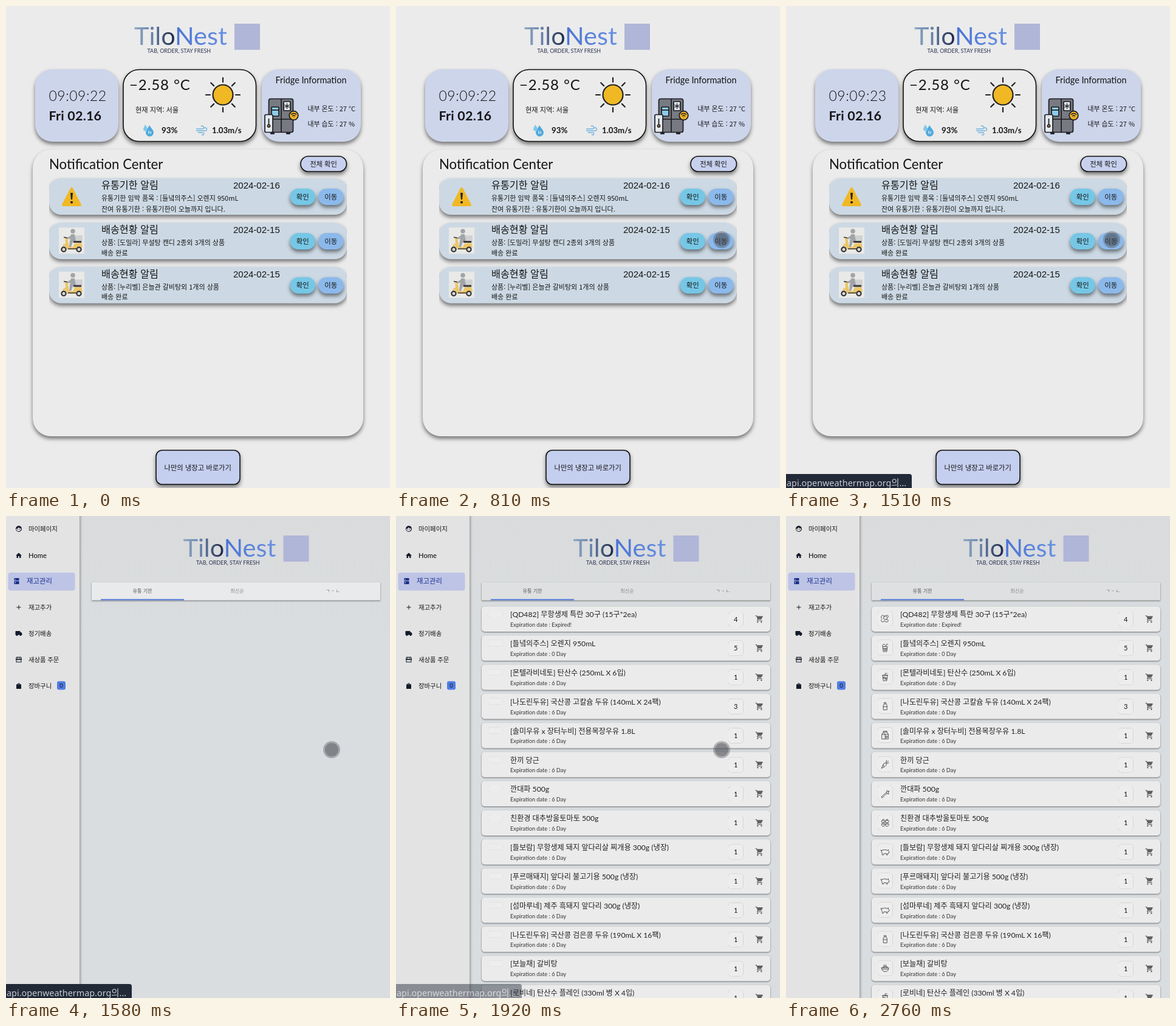
Animation of 632x792 px, one loop 2830 ms. Source, as an HTML page:

```html
<!DOCTYPE html>
<html lang="ko">
<head>
<meta charset="utf-8">
<style>
html, body { margin: 0; height: 100%; overflow: hidden; background: #ebebeb; }
svg { display: block; width: 100vw; height: 100vh; }
text { font-family: Lato, "Noto Sans CJK KR", sans-serif; fill: #151515; white-space: pre; }
.ko { font-family: "Noto Sans CJK KR", sans-serif; font-weight: 500; }
.date { font-family: "Liberation Sans", Arial, sans-serif; }
.mid { text-anchor: middle; }
.deep { filter: drop-shadow(0 4px 3px rgba(0,0,0,.5)); }
.soft { filter: drop-shadow(0 1px 1px rgba(0,0,0,.5)); }
.faint { filter: drop-shadow(0 .8px .6px rgba(0,0,0,.4)); }
.pale { filter: drop-shadow(0 .5px .5px rgba(0,0,0,.2)); }
.line { fill: none; stroke: #383838; stroke-width: 1.1; stroke-linejoin: round; stroke-linecap: round; }
.ink { stroke: #1b1b1f; stroke-width: 1.7; stroke-linejoin: round; }
</style>
</head>
<body>
<svg viewBox="0 0 632 792" preserveAspectRatio="none">
  <defs>
    <linearGradient id="word" gradientUnits="userSpaceOnUse" x1="211" y1="0" x2="364" y2="0">
      <stop offset="0" stop-color="#8ea8c2"/><stop offset=".2" stop-color="#657fa8"/>
      <stop offset=".42" stop-color="#1f2a48"/><stop offset=".44" stop-color="#4a73d3"/>
      <stop offset="1" stop-color="#6a92e2"/>
    </linearGradient>
    <linearGradient id="page" x2="0" y2="1">
      <stop offset="0" stop-color="#dadbdc"/><stop offset=".3" stop-color="#d9dde0"/>
    </linearGradient>
    <clipPath id="list"><rect x="71" y="276" width="490" height="230"/></clipPath>
    <g id="logo">
      <text x="211" y="64" font-size="41.5" style="fill:url(#word)">TiloNest</text>
      <text x="232.5" y="77" font-size="8.9" style="fill:#2c3350">TAB, ORDER, STAY FRESH</text>
      <rect x="376" y="29" width="42" height="43" fill="#b0b6d8"/>
    </g>
    <g id="warn">
      <path d="M37 17L51 44H23Z" fill="#f1b823" stroke="#f1b823" stroke-width="4" stroke-linejoin="round"/>
      <path d="M35 24h4l-1 11h-2z" fill="#222"/><circle cx="37" cy="39.5" r="2.1" fill="#222"/>
    </g>
    <g id="scooter">
      <rect x="16" y="8" width="42" height="43" fill="#e9e9e7"/>
      <rect x="43" y="21" width="12" height="12" fill="#cfd1d2"/>
      <g fill="#a2a5a8"><circle cx="39" cy="14" r="3.800"/>
      <path d="M36 19h6l2 11-5 2-3 8h-3l1-10z"/><path d="M36 21l-8 5 1 2 8-3z"/></g>
      <path d="M26 24l4 1 3 15h6l3-6 11-1 2 7-5 4H30l-4-6-4 2 1-4 4-2z" fill="#ecc668"/>
      <path d="M40 30h13v3H40z" fill="#39363a"/>
      <path d="M24 24l6 1M31 43h14" stroke="#333" stroke-width="1.300"/>
      <g fill="#d9d9d9" stroke="#333" stroke-width="2.200"><circle cx="24" cy="44" r="3.600"/><circle cx="49" cy="44" r="3.600"/></g>
    </g>
  </defs>

  <g id="home">
    <rect width="632" height="792" fill="#ebebeb"/>
    <use href="#logo"/>
    <g fill="#cdd5eb" class="deep">
      <rect x="48" y="104" width="137" height="119" rx="28"/>
      <rect x="421" y="104" width="163" height="119" rx="28"/>
      <rect x="193" y="104.500" width="218.500" height="118" rx="26" fill="#ebebeb" stroke="#111" stroke-width="1.600"/>
    </g>
    <text id="clock" x="70.500" y="156" font-size="23" font-weight="300" letter-spacing=".5"></text>
    <text x="70.500" y="188" font-size="21.500" font-weight="700" letter-spacing=".2">Fri 02.16</text>
    <text x="203" y="138" font-size="24" letter-spacing=".9">−2.58 °C</text>
    <text class="ko" x="213" y="174.500" font-size="11.200">현재 지역: 서울</text>
    <text x="256" y="209" font-size="13.300" font-weight="700">93%</text>
    <text x="339" y="209" font-size="13.200" font-weight="700">1.03m/s</text>
    <g id="sun" transform="translate(357 146)" stroke="#222" stroke-width="2.200" stroke-linecap="round">
      <circle r="16.500" fill="#f0b824"/>
    </g>
    <path d="M236 196c5 7 7 9 7 12a6 6 0 0 1-13 0c0-3 3-6 6-12z" fill="#4fa9dc"/>
    <path d="M229 195c3 4 4 5 4 7a3.500 3.500 0 0 1-7 0c0-2 2-4 3-7z" fill="#81c7ea"/>
    <path d="M235 205v5m3-4v4" stroke="#e4f3fb" stroke-width="1.300"/>
    <path d="M313 202h10a2.500 2.500 0 1 0-2-4M313 205h15a2.500 2.500 0 1 0-2-4M316 208h8a2 2 0 1 1-2 3" fill="none" stroke="#72b4de" stroke-width="1.400"/>
    <text x="443.500" y="127" font-size="14.400">Fridge Information</text>
    <text class="ko" x="496.500" y="173" font-size="10.900">내부 온도 : 27 °C</text>
    <text class="ko" x="496.500" y="198" font-size="10.900">내부 습도 : 27 %</text>
    <g class="ink">
      <path d="M436 207h5v3h-5zm26 0h5v3h-5z" fill="#333"/>
      <rect x="432.500" y="152.500" width="40" height="55" rx="3" fill="#777a82"/>
      <path d="M453 153v54M433 186h39" fill="none"/>
      <rect x="437" y="166" width="12" height="15" rx="1" fill="#8ccbe9"/>
      <path d="M437 171h12" fill="none"/>
      <rect x="457" y="157" width="11" height="15" rx="1" fill="#dfe5ea"/>
      <path d="M462.500 160v9m-4-6.500l8 4m0-4l-8 4" fill="none" stroke-width="1.200"/>
      <rect x="426" y="178.500" width="13" height="29" rx="2" fill="#e4e9ee"/>
      <path d="M432.500 185v10" fill="none"/><circle cx="432.500" cy="197" r="2" fill="#e4a32b"/>
      <circle cx="473.500" cy="180" r="7.300" fill="#f0b429"/>
      <path d="M469 178.500q4.500-4 9 0m-7 2.500q2.500-2 5 0m-2.500 2.500v.5" fill="none" stroke-width="1.400"/>
    </g>
    <rect x="44" y="236" width="544" height="471" rx="30" fill="#ebebeb" class="deep"/>
    <text x="71" y="268" font-size="22.200">Notification Center</text>
    <g class="deep" stroke="#111" stroke-width="1.600">
      <rect x="485" y="247" width="75.500" height="25" rx="12.500" fill="#c7d1ee"/>
      <rect x="247" y="730" width="138" height="56" rx="10" fill="#c4ceee"/>
    </g>
    <text class="ko mid" x="522.500" y="263.500" font-size="11.300">전체 확인</text>
    <text class="ko mid" x="315.700" y="762.500" font-size="11.300">나만의 냉장고 바로가기</text>
    <g id="notes" clip-path="url(#list)"></g>
  </g>

  <g id="stock">
    <rect width="632" height="792" fill="url(#page)"/>
    <rect x="-10" y="-10" width="131" height="812" fill="#e3e3e3" style="filter:drop-shadow(1px 0 2px rgba(0,0,0,.4))"/>
    <rect x="3.500" y="93" width="110" height="29.500" rx="4" fill="#bdc4e6"/>
    <g id="menu"></g>
    <rect x="84" y="271.500" width="14" height="14" rx="3" fill="#4f7ce4"/>
    <text class="mid" x="91" y="282" font-size="9.500">0</text>
    <use href="#logo" x="80.500" y="3"/>
    <rect id="tabs" x="141" y="109" width="475" height="29.500" class="soft"/>
    <rect x="156" y="136.500" width="137" height="2" fill="#5079dc"/>
    <g class="mid" font-size="8.100">
      <text class="ko" x="224.500" y="126" style="fill:#555">유통 기한</text>
      <text class="ko" x="380.500" y="126" style="fill:#888">최신순</text>
      <text class="ko" x="538" y="126" style="fill:#777">ㄱ ~ ㄴ</text>
    </g>
    <g id="rows"></g>
  </g>

  <g id="status">
    <path d="M0 769H203a4 4 0 0 1 4 4V792H0Z" fill="#222a38"/>
    <text x="1" y="788.500" font-size="14.400" style="font-family:'Noto Sans','Noto Sans CJK KR',sans-serif;fill:#c6cbd4">api.openweathermap.org의...</text>
  </g>
  <g id="cursor" fill="#484a50"><circle r="14" fill-opacity=".36"/><circle r="11" fill-opacity=".4"/></g>
</svg>
<script>
const $ = id => document.getElementById(id);
const add = (id, markup) => $(id).insertAdjacentHTML('beforeend', markup);
const show = (id, on) => { $(id).style.display = on ? '' : 'none'; };

for (let a = 0; a < 360; a += 45) add('sun', `<path d="M21 0H28" transform="rotate(${a})"/>`);

const pill = (x, label, color) => `
  <rect x="${x}" y="17" width="41.500" height="27" rx="13.500" fill="${color}" class="deep"/>
  <text class="ko mid" x="${x + 20.8}" y="34.500" font-size="11.400">${label}</text>`;

[
  [283, 'warn', '유통기한 알림', '2024-02-16', '유통기한 임박 품목 : [들녘의주스] 오렌지 950mL', '잔여 유통기한 : 유통기한이 오늘까지 입니다.', 55],
  [356, 'scooter', '배송현황 알림', '2024-02-15', '상품: [도밀라] 무설탕 캔디 2종외 3개의 상품', '배송 완료', 54],
  [428.5, 'scooter', '배송현황 알림', '2024-02-15', '상품: [누리벨] 은늘관 갈비탕외 1개의 상품', '배송 완료', 53.5]
].forEach(([y, icon, title, date, a, b, yb]) => add('notes', `<g transform="translate(71 ${y})">
  <rect width="490" height="60" rx="20" fill="#ccd9e4" class="deep"/><use href="#${icon}"/>
  <text class="ko" x="86" y="17" font-size="16.200">${title}</text>
  <text class="date" x="303" y="17" font-size="15">${date}</text>
  <text class="ko" x="86" y="37" font-size="11">${a}</text>
  <text class="ko" x="86" y="${yb}" font-size="11">${b}</text>
  ${pill(396.5, '확인', '#76c7e6')}${pill(443, '이동', '#8cb9eb')}</g>`));

// Sidebar: label, centre y, icon on a 24 unit grid
[
  ['마이페이지', 21, 'M12 2a10 10 0 1 0 .1 0zM12 20a8 8 0 0 1-8-8c4 0 6-2 7-5 2 3 5 4 8.500 3.500A8 8 0 0 1 12 20zM8 12h2v3H8zM14 12h2v3h-2z'],
  ['Home', 65, 'M10 20v-6h4v6h5v-8h3L12 3 2 12h3v8z'],
  ['재고관리', 107, 'M4 2h16v8H4zM4 12h16v10H4zM7 5v3h2V5zM7 14v5h2v-5z'],
  ['재고추가', 150, 'M19 13h-6v6h-2v-6H5v-2h6V5h2v6h6z'],
  ['정기배송', 193, 'M20 8h-3V4H3c-1.100 0-2 .9-2 2v11h2c0 1.660 1.340 3 3 3s3-1.340 3-3h6c0 1.660 1.340 3 3 3s3-1.340 3-3h2v-5l-3-4z'],
  ['새상품 주문', 236, 'M4 3h16l2 7v3h-1v8H3v-8H2v-3zM5 13v6h14v-6zM6 5l-1 5h3V5zM10 5v5h4V5zM16 5v5h3l-1-5z'],
  ['장바구니', 279, 'M4 7h4a4 4 0 0 1 8 0h4v15H4zM10 7h4a2 2 0 0 0-4 0z']
].forEach(([label, y, d], i) => {
  const on = i == 2;
  add('menu', `<path d="${d}" transform="translate(${on ? 11.5 : 15} ${y - 6}) scale(.5)" fill-rule="evenodd" fill="${on ? '#1b2f86' : '#151b2b'}"/>
    <text x="${on ? 34 : 37}" y="${y + 4}" font-size="${on ? 11.4 : label == 'Home' ? 11.2 : 10.4}" font-weight="500"${on ? ' style="fill:#1e3190"' : ''}>${label}</text>`);
});

const art = {
  egg: 'M4 11a4 4 0 1 1 7-3M9 12a4 4 0 1 1 7-3 4 3 0 0 1-7 3M5 13a4 3 0 1 0 6 3M11 17a4 3 0 1 0 3-4M13 6a3 3 0 1 1 5 3',
  juice: 'M7 9h10l-1.500 11h-7zM8 13h8M13 9l2-5h3M7 9a3 3 0 1 1 5-3M9 15h6m-5.500 2h5',
  drink: 'M7 8h10l-1.500 12h-7zM6 8h12M12 8V4h4M9 12h3v3H9zM13 14h2v3h-2z',
  bottle: 'M10 4h4v3l2 3v10H8V10l2-3zM10 7h4M8 13h8',
  milk: 'M5 10l3-5h8l3 5v10H5zM5 10h14M8 5l4 5v10M8 3h8v2M14 14h3v3h-3z',
  carrot: 'M4 20l5-10q4-3 6 1 0 3-4 6zM14 9l5-5m-4 6l5-2m-6 0l1-5M8 13l2 2m-3 0l2 2',
  leek: 'M4 19l10-9 2 1-10 10zM15 10l1-5 2 3 3-2-2 4 1 3-4-1M4 19l2 2',
  tomato: 'M8 5a4 4 0 1 0 .1 0zM16 5a4 4 0 1 0 .1 0zM8 12a4 4 0 1 0 .1 0zM16 12a4 4 0 1 0 .1 0zM6 7l4 2m4-1l4-1m-12 8l4 1m4 0l4-1',
  pig: 'M4 9q8-3 13 0l2-2v3l2 2v2l-3 1-1 4h-2v-3H9l-1 3H6l-1-5q-2-2-1-5zM4 10l-2-2',
  bowl: 'M4 11h16q0 6-5 8H9q-5-2-5-8zM6 11q1-4 6-4t6 4M9 6l1-2m3 2l1-2M6 14h12M8 9h8'
};
const cart = 'M7 18c-1.100 0-1.990.9-1.990 2S5.900 22 7 22s2-.9 2-2-.9-2-2-2zM1 2v2h2l3.600 7.590-1.350 2.450c-.16.28-.25.61-.25.96 0 1.100.9 2 2 2h12v-2H7.420c-.14 0-.25-.11-.25-.25l.03-.12.9-1.630h7.450c.75 0 1.410-.41 1.750-1.030l3.580-6.490c.08-.14.12-.31.12-.48 0-.55-.45-1-1-1H5.210l-.94-2H1zm16 16c-1.100 0-1.990.9-1.990 2s.89 2 1.990 2 2-.9 2-2-.9-2-2-2z';

[
  ['egg', '[QD482] 무항생제 특란 30구 (15구*2ea)', 4, 'Expired!'],
  ['juice', '[들녘의주스] 오렌지 950mL', 5, '0 Day'],
  ['drink', '[몬텔라비네토] 탄산수 (250mL X 6입)'],
  ['bottle', '[나도린두유] 국산콩 고칼슘 두유 (140mL X 24팩)', 3],
  ['milk', '[솔미우유 x 장터누비] 전용목장우유 1.8L'],
  ['carrot', '한끼 당근'],
  ['leek', '깐대파 500g'],
  ['tomato', '친환경 대추방울토마토 500g'],
  ['pig', '[들보람] 무항생제 돼지 앞다리살 찌개용 300g (냉장)'],
  ['pig', '[푸르매돼지] 앞다리 불고기용 500g (냉장)'],
  ['pig', '[섬마루네] 제주 흑돼지 앞다리 300g (냉장)'],
  ['bottle', '[나도린두유] 국산콩 검은콩 두유 (190mL X 16팩)'],
  ['bowl', '[보늘채] 갈비탕'],
  ['drink', '[로비네] 탄산수 플레인 (330ml 병 X 4입)']
].forEach(([icon, name, count = 1, left = '6 Day'], i) => add('rows', `<g transform="translate(141 ${148.5 + 47.85 * i})">
  <rect width="475" height="41.500" rx="5" fill="#ebebeb" class="soft"/>
  <rect class="thumb" x="10" y="7.500" width="24.500" rx="5" fill="#ededed"/>
  <path class="line art" d="${art[icon]}" transform="translate(13.200 11.500) scale(.75)"/>
  <text x="47" y="17.800" font-size="12.150" style="fill:#222">${name}</text>
  <text x="47" y="33.600" font-size="9.200" style="fill:#333">Expiration date : ${left}</text>
  <rect x="406" y="8.500" width="24.500" height="25" rx="5" fill="#ededed" class="faint"/>
  <text class="mid" x="418.200" y="25" font-size="11">${count}</text>
  <path d="${cart}" transform="translate(450 13.500) scale(.61)" fill="#606060"/></g>`));

const thumbs = document.querySelectorAll('.thumb'), arts = document.querySelectorAll('.art');
const clamp = v => Math.max(0, Math.min(1, v));
const mix = (a, b, k) => a + (b - a) * k;

function draw(t) {
  show('home', t < 1580);
  show('stock', t >= 1580);
  $('clock').textContent = t < 1020 ? '09:09:22' : '09:09:23';

  const listed = t >= 1790, loaded = t >= 1990;
  show('rows', listed);
  $('tabs').setAttribute('fill', listed ? '#dfe0e1' : '#e9eaeb');
  thumbs.forEach(el => {
    el.setAttribute('height', loaded ? 25 : 10);
    el.setAttribute('class', loaded ? 'thumb faint' : 'thumb pale');
  });
  arts.forEach(el => { el.style.display = loaded ? '' : 'none'; });

  show('status', t >= 1440 && t < 1985);
  $('status').style.opacity = clamp((1980 - t) / 130);

  // Pointer slides in from the right edge, then settles on the button
  show('cursor', t >= 455 && t < 2060);
  const enter = 1 - (1 - clamp((t - 440) / 160)) ** 2;
  const settle = 1 - (1 - clamp((t - 600) / 200)) ** 2;
  const x = mix(mix(645, 543, enter), 536, settle);
  const y = mix(mix(500, 412, enter), 384, settle);
  $('cursor').setAttribute('transform', `translate(${x} ${y})`);
}

let start;
function tick(now) {
  start ??= now;
  draw((now - start) % 2830);
  requestAnimationFrame(tick);
}
draw(0);
requestAnimationFrame(tick);
</script>
</body>
</html>
```
